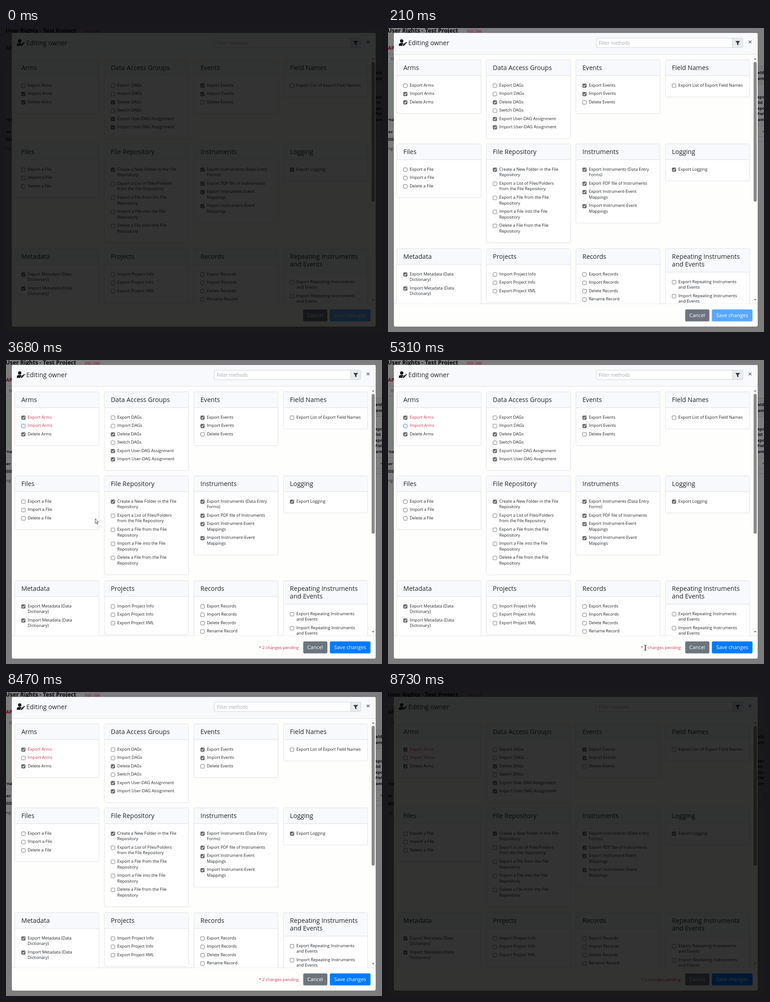
Write an HTML page that moves like this. It is 833x673 px and loops after 8.78 s.

```html
<!DOCTYPE html>
<html lang="en">
<head>
<meta charset="utf-8">
<title>Editing method rights</title>
<style>
  html, body { margin: 0; width: 100%; height: 100%; overflow: hidden; background: #000; }
  svg { display: block; width: 833px; height: 673px; font-family: "Open Sans", "Noto Sans", sans-serif; }
  .label { font-size: 9.24px; fill: #212529; }
  .heading { font-size: 14.15px; fill: #212529; }
  .button { font-size: 11.3px; fill: #fff; }
  .behind { font-size: 9.2px; font-weight: 700; fill: #0d0e10; }
  .changed { fill: #c83a55; }
</style>
</head>
<body>
<svg id="stage" viewBox="0 0 833 673">
  <defs>
    <clipPath id="bodyClip"><rect x="13" y="59" width="806" height="551.5"/></clipPath>
  </defs>

  <rect width="833" height="673" fill="#7d7d7d"/>
  <g id="page">
    <rect y="85" width="13" height="108" fill="#797e79"/>
    <rect x="819" y="84" width="14" height="41" fill="#787878"/>
    <path d="M0 57.5h13M0 79.5h13M0 216.5h13M0 239.5h13M819 84.5h14M819 125.5h14M819 216.5h14M819 240.5h14M819 251.5h14" stroke="#6a6a6a"/>
    <rect y="243" width="13" height="7" fill="#484848"/>
    <rect x="173" y="2" width="37" height="9" fill="#7b7476"/>
    <text x="-1" y="10" font-size="12.7" font-weight="700" fill="#08090a">User Rights - Test Project</text>
    <text x="176" y="10" font-size="7.4" fill="#8a2438" font-family="'Liberation Mono', monospace">PID 298</text>
    <text x="0" y="47.5" font-size="10.5" font-weight="700" fill="#5c0714">API</text>
  </g>

  <rect x="13" y="11" width="806" height="650" rx="3.5" fill="#fefefd"/>
  <path d="M13 58V14.500a3.500 3.500 0 0 1 3.500-3.500h799a3.500 3.500 0 0 1 3.500 3.500V58z" fill="#f8f9fc"/>
  <path d="M13 58.500h806M13 610.500h806" stroke="#dee2e6"/>

  <g fill="#16181b">
    <circle cx="30.300" cy="28.800" r="3.700"/>
    <path d="M24 39.500v-2c0-3 2-4.200 4.500-4.200h4l2.300.8-2.600 2.800-.5 2.600z"/>
    <path d="M32.700 39.800l.5-2.700 4.700-4.700 2.200 2.200-4.700 4.700zM38.500 31.800l.8-.8q.6-.5 1.200 0l1 1q.5.600 0 1.200l-.8.8z"/>
  </g>
  <text class="heading" x="45" y="37.500">Editing owner</text>

  <rect x="461.500" y="22.500" width="302" height="21" rx="2.500" fill="#fff" stroke="#ced4da"/>
  <path d="M763.500 22.500h20a2.500 2.500 0 0 1 2.500 2.500v16a2.500 2.500 0 0 1-2.500 2.500h-20z" fill="#e9ecef" stroke="#ced4da"/>
  <path d="M770 29h9.500l-3.600 4.300v4.700l-2.300-1.700v-3z" fill="#30353a" stroke="#30353a" stroke-width=".6" stroke-linejoin="round"/>
  <text x="467" y="36.800" font-size="10.200" fill="#a2a7ac">Filter methods</text>
  <path d="M799.200 28l5.800 5.800m0-5.800l-5.800 5.800" stroke="#606468" stroke-width="1.500"/>

  <g id="cards" clip-path="url(#bodyClip)"></g>

  <rect x="810" y="75" width="7" height="309.500" rx="3.500" fill="#8b8b8b"/>
  <path d="M810.500 70l3-3.800 3 3.800zM810.500 600l3 3.800 3-3.800z" fill="#858585"/>

  <text id="pending" class="label changed" x="648.500" y="640" text-anchor="end"></text>
  <rect x="658.500" y="623" width="53.500" height="26.500" rx="2.800" fill="#6c757d"/>
  <text class="button" x="667.500" y="640.300">Cancel</text>
  <rect id="save" x="717.500" y="623" width="90" height="26.500" rx="2.800" fill="#007bff"/>
  <text class="button" x="727" y="640.300">Save changes</text>

  <path id="arrow" d="M0 0v10.200l2.400-2.200 1.800 4.100 1.700-.8-1.800-3.900h3.300z" fill="#fff" stroke="#111" stroke-width=".8"/>
  <path id="beam" d="M-2.500-5.500h1.700l.8.700.8-.7h1.700M0-4.800v9.600M-2.500 5.500h1.700l.8-.7.8.7h1.700" fill="none" stroke="#222" stroke-width="1.100"/>
  <rect id="shade" width="833" height="673"/>
</svg>
<script>
const LOOP = 8780, FIRST_CLICK = 2150, SECOND_CLICK = 3100, BLUR = 8360;
const byId = id => document.getElementById(id);

function add(parent, tag, attrs, text = '') {
  const node = document.createElementNS('http://www.w3.org/2000/svg', tag);
  for (const name in attrs) node.setAttribute(name, attrs[name]);
  node.textContent = text;
  return parent.appendChild(node);
}

// Clipped text on the page behind the dialog
[[-2, 206, 'rna'], [-5, 233, 'ner'], [819, 102, 'eld'], [819, 115, 'am'],
 [818, 156, 'xpo'], [819, 168, 'ist ('], [818, 181, 'xpo'], [818, 193, 'Fiel'], [819, 206, 'am']]
  .forEach(([x, y, text]) => add(byId('page'), 'text', { x, y, class: 'behind' }, text));
add(byId('page'), 'text', { x: 0, y: 270, class: 'label' }, 'ng');
add(byId('page'), 'text', { x: 6, y: 72, class: 'label' }, '10');
add(byId('page'), 'path', { d: 'M830 227l4 4m0-4l-4 4', stroke: '#7c1a22' });

// "+" marks a ticked method, "/" a line break
const rows = [
  [70.5, [
    ['Arms', '-Export Arms', '+Import Arms', '+Delete Arms'],
    ['Data Access Groups', '-Export DAGs', '-Import DAGs', '+Delete DAGs', '-Switch DAGs',
      '+Export User-DAG Assignment', '+Import User-DAG Assignment'],
    ['Events', '+Export Events', '+Import Events', '-Delete Events'],
    ['Field Names', '-Export List of Export Field Names']]],
  [256.5, [
    ['Files', '-Export a File', '-Import a File', '-Delete a File'],
    ['File Repository', '+Create a New Folder in the File/Repository', '-Export a List of Files|Folders/from the File Repository',
      '-Export a File from the File/Repository', '-Import a File into the File/Repository',
      '-Delete a File from the File/Repository'],
    ['Instruments', '+Export Instruments (Data Entry/Forms)', '+Export PDF file of Instruments',
      '+Export Instrument-Event/Mappings', '+Import Instrument-Event/Mappings'],
    ['Logging', '+Export Logging']]],
  [488.5, [
    ['Metadata', '+Export Metadata (Data/Dictionary)', '+Import Metadata (Data/Dictionary)'],
    ['Projects', '-Import Project Info', '-Export Project Info', '-Export Project XML'],
    ['Records', '-Export Records', '-Import Records', '-Delete Records', '-Rename Record', '-Delete Record Logs'],
    ['Repeating Instruments/and Events', '-Export Repeating Instruments/and Events',
      '-Import Repeating Instruments/and Events']]]
];

function addMethod(x, y, spec) {
  const box = add(byId('cards'), 'rect', { x: x + 14.9, y: y - 2.9, width: 8.2, height: 8.2, rx: 1.4 });
  const tick = add(byId('cards'), 'path', {
    d: `M${x + 16.7} ${y + 1.2}l1.800 1.900 3.300-4.200`, fill: 'none', stroke: '#fff', 'stroke-width': 1.3 });
  const lines = spec.slice(1).split('/').map((line, i) =>
    add(byId('cards'), 'text', { x: x + 28.6, y: y + 3.2 + i * 12.6, class: 'label' }, line.replace('|', '/')));
  const set = (checked, changed, focused) => {
    box.setAttribute('fill', checked ? '#686868' : focused ? '#eef6ff' : '#fff');
    box.setAttribute('stroke', focused && !checked ? '#4d87bd' : checked ? '#686868' : '#767676');
    tick.setAttribute('visibility', checked ? 'visible' : 'hidden');
    lines.forEach(line => line.classList.toggle('changed', changed));
  };
  set(spec[0] === '+', false, false);
  return { set, height: 18.45 + (lines.length - 1) * 12.65 };
}

function addCard(x, y, [title, ...specs]) {
  const titles = title.split('/');
  const headHeight = 35 + (titles.length - 1) * 17;
  const frame = add(byId('cards'), 'rect', { x, y, width: 186.5, rx: 2.5, fill: '#fff', stroke: '#dfe0e1' });
  add(byId('cards'), 'path', {
    d: `M${x + .5} ${y + headHeight}v${2.5 - headHeight}q0-2 2-2h181.500q2 0 2 2v${headHeight - 2.5}z`, fill: '#f8f9fc' });
  add(byId('cards'), 'path', { d: `M${x} ${y + headHeight}h186.500`, stroke: '#dfe0e1' });
  titles.forEach((line, i) =>
    add(byId('cards'), 'text', { x: x + 14.4, y: y + 22.4 + i * 17, class: 'heading' }, line));
  let offset = headHeight + 21;
  const methods = specs.map(spec => {
    const method = addMethod(x, y + offset, spec);
    offset += method.height;
    return method;
  });
  frame.setAttribute('height', offset + 7.7);
  return methods;
}

const cards = rows.flatMap(([y, list]) => list.map((card, i) => addCard(19.5 + i * 198.4, y, card)));
const [exportArms, importArms] = cards[0];

// Pointer path: time, x, y
const pointer = [
  [780, 560, 622], [1630, 108, 126], [2000, 62, 127], [2300, 62, 127], [2950, 61, 145], [3310, 61, 145],
  [4150, 392, 645], [5050, 570, 637], [6840, 570, 637], [7360, 758, 493]
];
const clamp = v => Math.min(1, Math.max(0, v));
const ease = v => v * v * (3 - 2 * v);

function pointerAt(t) {
  const i = pointer.findIndex(([time]) => t < time);
  if (i < 1) return null;
  const [t0, x0, y0] = pointer[i - 1], [t1, x1, y1] = pointer[i];
  const k = ease((t - t0) / (t1 - t0));
  return [x0 + (x1 - x0) * k, y0 + (y1 - y0) * k];
}

function brightness(t) {
  if (t < 210) return .2 + .2 * Math.min(3, Math.floor(t / 50));
  if (t >= 8580) return .8 - .2 * Math.floor((t - 8580) / 50);
  return 1;
}

function render(t) {
  const first = t >= FIRST_CLICK, second = t >= SECOND_CLICK;
  exportArms.set(first, first, first && !second);
  importArms.set(!second, second, second && t < BLUR);
  byId('pending').textContent = second ? '* 2 changes pending' : first ? '* 1 change pending' : '';
  byId('save').setAttribute('fill-opacity', .65 + .35 * clamp((t - FIRST_CLICK) / 150));

  const at = pointerAt(t);
  const overText = at && at[0] > 559 && at[0] < 649 && at[1] > 630 && at[1] < 644;
  for (const [id, shown] of [['arrow', at && !overText], ['beam', overText]]) {
    byId(id).setAttribute('visibility', shown ? 'visible' : 'hidden');
    if (shown) byId(id).setAttribute('transform', `translate(${at})`);
  }
  byId('shade').setAttribute('opacity', 1 - Math.max(.2, brightness(t)));
}

const start = performance.now();
function tick() {
  render((performance.now() - start) % LOOP);
  requestAnimationFrame(tick);
}
tick();
</script>
</body>
</html>
```
